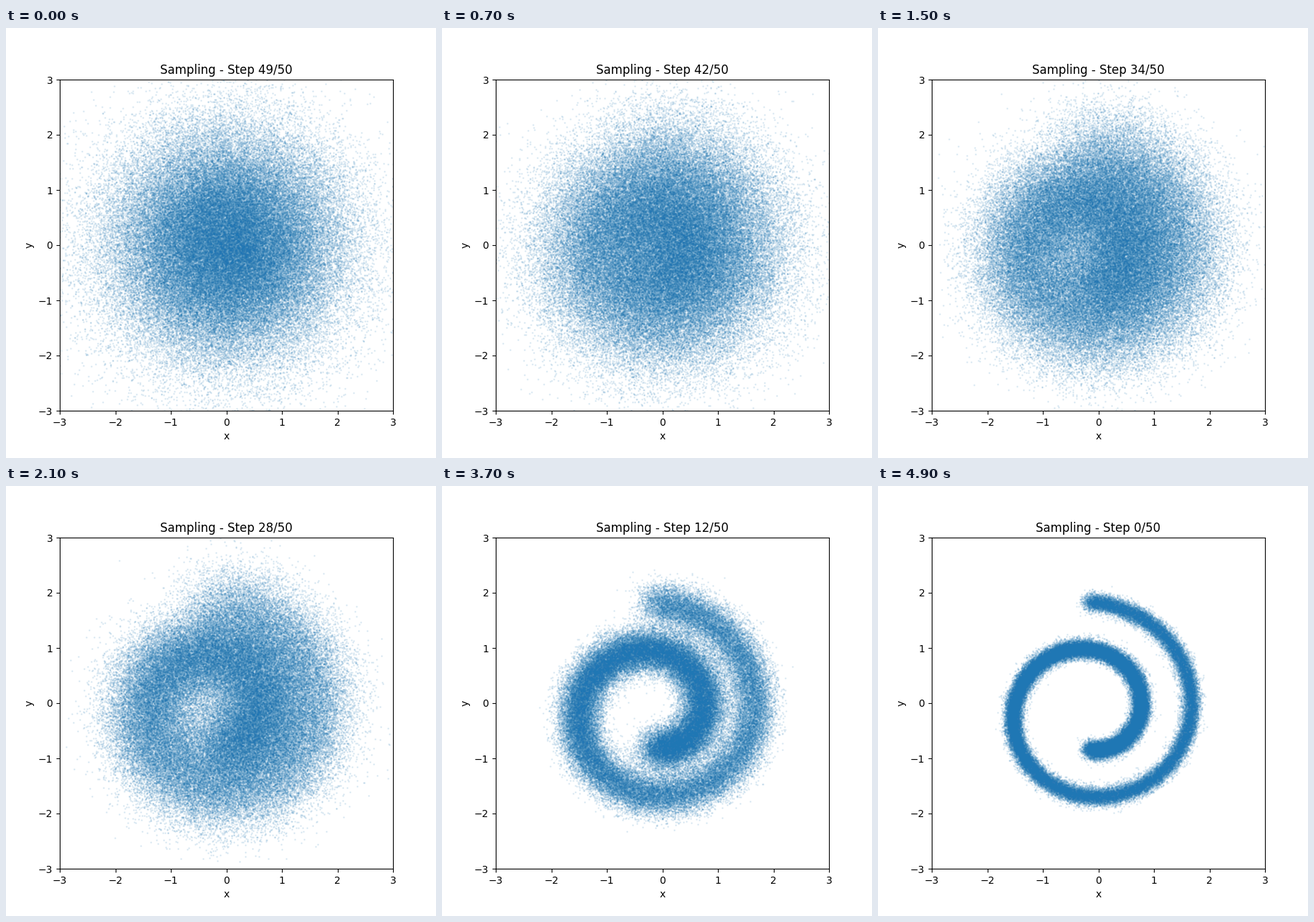
Animation, 600 px wide and 600 px high, one loop 5000 ms. Source, as a matplotlib script:

```python
import numpy as np
import matplotlib.pyplot as plt
from matplotlib.animation import FuncAnimation

STEPS = 50
COUNT = 100_000
BAND = 0.075          # thickness (std) of the spiral band
LIMIT, CELLS = 5.0, 300

rng = np.random.default_rng(7)
betas = np.linspace(1e-4, 0.02, STEPS)
signal = np.cumprod(1 - betas)

# Spiral centre line: one and a half turns, measured in quarter turns.
quarter = np.linspace(0, 6, 400)
angle = (quarter + 3) * np.pi / 2
curve_x = (0.690 + 0.2275 * quarter) * np.cos(angle) - 0.1575
curve_y = (0.694 + 0.2140 * quarter) * np.sin(angle) - 0.141

axis = np.linspace(-LIMIT, LIMIT, CELLS + 1)


def bilinear(fields, points):
    """Sample grid fields indexed [..., y, x] at the given points."""
    pos = np.clip((points + LIMIT) / (2 * LIMIT) * CELLS, 0, CELLS - 1e-6)
    cell = pos.astype(int)
    (fx, fy), (i, j) = (pos - cell).T, cell.T
    low = fields[:, j, i] * (1 - fx) + fields[:, j, i + 1] * fx
    high = fields[:, j + 1, i] * (1 - fx) + fields[:, j + 1, i + 1] * fx
    return (low * (1 - fy) + high * fy).T


def score(points, step):
    """Gradient of the log density of the noised spiral."""
    shrink = np.sqrt(signal[step])
    variance = signal[step] * BAND**2 + 1 - signal[step]
    gx = np.exp(-(axis[:, None] - shrink * curve_x) ** 2 / (2 * variance))
    gy = np.exp(-(axis[:, None] - shrink * curve_y) ** 2 / (2 * variance))
    weight = gy @ gx.T + 1e-290
    mean = np.stack([(gy * c) @ gx.T / weight for c in (curve_x, curve_y)])
    return (shrink * bilinear(mean, points) - points) / variance


def denoise():
    """Reverse diffusion from plain Gaussian noise to the spiral."""
    points = rng.standard_normal((COUNT, 2))
    states = []
    for step in reversed(range(STEPS)):
        beta = betas[step]
        points = (points + beta * score(points, step)) / np.sqrt(1 - beta)
        if step:
            points += np.sqrt(beta) * rng.standard_normal(points.shape)
        states.append(points.astype(np.float32))
    return states


states = denoise()

fig, ax = plt.subplots(figsize=(6, 6), dpi=100)
ax.set(xlim=(-3, 3), ylim=(-3, 3), xlabel="x", ylabel="y")
cloud = ax.scatter(*states[0].T, s=1, alpha=0.1, color="C0")
title = ax.set_title("")


def draw(frame):
    cloud.set_offsets(states[frame])
    title.set_text(f"Sampling - Step {STEPS - 1 - frame}/{STEPS}")
    return cloud, title


anim = FuncAnimation(fig, draw, frames=STEPS, interval=100, repeat=True)
plt.show()
```
